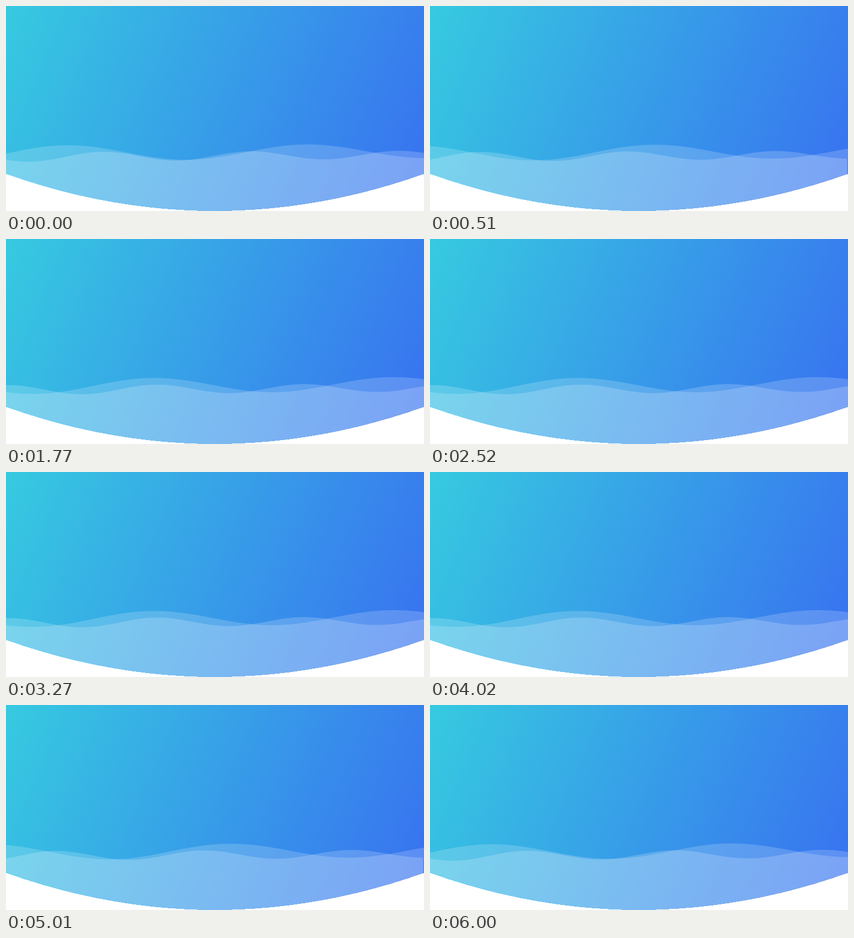
An HTML page that plays this animation: 750x368 px, repeating every 6030 ms.

```html
<!DOCTYPE html>
<html lang="en">
<head>
<meta charset="utf-8">
<title>Waves</title>
<style>
  html, body { margin: 0; width: 100%; height: 100%; overflow: hidden; background: #fff; }
  svg { display: block; width: 750px; height: 368px; }
</style>
</head>
<body>
<svg viewBox="0 0 750 368">
  <defs>
    <linearGradient id="sea" gradientUnits="userSpaceOnUse" x1="0" y1="0" x2="750" y2="318">
      <stop offset="0" stop-color="#36cae0"/>
      <stop offset="1" stop-color="#3872f0"/>
    </linearGradient>
  </defs>
  <rect width="750" height="368" fill="url(#sea)"/>
  <path id="back" fill="#fff" fill-opacity=".18"/>
  <path id="front" fill="#fff" fill-opacity=".19"/>
  <path d="M0 301.5Q375 434.5 750 301.5V368H0Z" fill="#fff" shape-rendering="crispEdges"/>
</svg>
<script>
  const LOOP = 6030, TICK = 30, STEPS = 25, WIDTH = 750, HEIGHT = 368;

  // Crest and trough lines are [height at x = 0, slope]; start is the first crest.
  const waves = [
    { id: 'back', length: 430, start: 110, crest: [250.4, -0.0035], trough: [278.4, -0.0072] },
    { id: 'front', length: 265, start: 174.5, crest: [262.3, -0.0033], trough: [279.8, -0.0078], wrap: 17 }
  ];
  for (const wave of waves) wave.path = document.getElementById(wave.id);

  const lineAt = ([base, slope], x) => base + slope * x;

  function heightAt(wave, x, shift) {
    const top = lineAt(wave.crest, x), bottom = lineAt(wave.trough, x);
    const angle = 2 * Math.PI * (x - wave.start - shift) / wave.length;
    return (top + bottom - (bottom - top) * Math.cos(angle)) / 2;
  }

  // The front layer jumps back one wavelength at its wrap step, just short of the edge.
  function rightEnd(wave, step) {
    if (wave.wrap === undefined) return WIDTH;
    const moved = (step - wave.wrap + STEPS) % STEPS / STEPS;
    return Math.min(WIDTH, 748 + wave.length * moved);
  }

  function draw(wave, step) {
    const shift = wave.length * step / STEPS;
    const end = rightEnd(wave, step);
    let d = `M0 ${HEIGHT}`;
    for (let x = 0; x < end; x += 3) d += `L${x} ${heightAt(wave, x, shift).toFixed(2)}`;
    d += `L${end} ${heightAt(wave, end, shift).toFixed(2)}V${HEIGHT}Z`;
    wave.path.setAttribute('d', d);
  }

  let shown = -1;
  function frame() {
    const step = Math.floor(performance.now() % LOOP / TICK) % STEPS;
    if (step !== shown) {
      shown = step;
      waves.forEach(wave => draw(wave, step));
    }
    requestAnimationFrame(frame);
  }
  frame();
</script>
</body>
</html>
```
